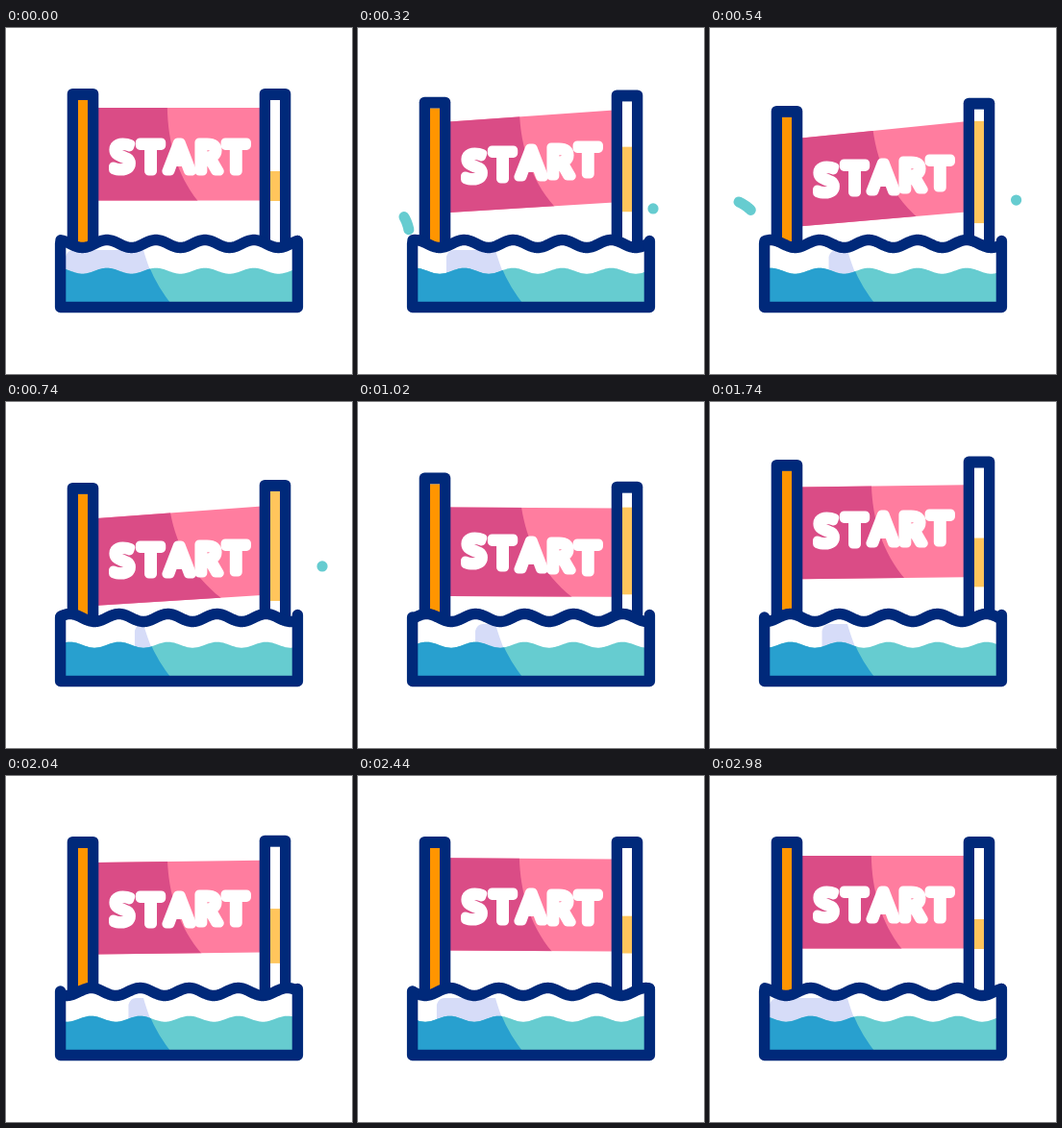
An HTML page with a canvas for the animation above (3 s loop, 360 by 360 pixels).

```html
<!DOCTYPE html>
<html lang="en">
<head>
<meta charset="utf-8">
<title>Start banner in water</title>
<style>
html, body { margin: 0; width: 100%; height: 100%; overflow: hidden; background: #fff; }
canvas { display: block; }
</style>
</head>
<body>
<canvas id="stage" width="360" height="360"></canvas>
<script>
const ctx = document.getElementById('stage').getContext('2d');
const LOOP = 3000;
const WAVELENGTH = 51;
const NAVY = '#00297a', ORANGE = '#ff9500', GOLD = '#ffc55c', TEAL = '#66ccd0',
  BLUE = '#28a0cf', PINK = '#ff7d9f', MAGENTA = '#da4c86', LAVENDER = '#d6dcf8';

const ramp = (t, a, b) => Math.min(1, Math.max(0, (t - a) / (b - a)));
const ease = (t, a, b) => (1 - Math.cos(Math.PI * ramp(t, a, b))) / 2;

// Sink, rise, swing back and settle; parts further right follow later.
function bob(t, x, sink, rise, back) {
  const u = t - (x - 80);
  return sink * ease(u, 0, 720) + (rise - sink) * ease(u, 720, 1440)
    + (back - rise) * ease(u, 1440, 2000) - back * ease(u, 2000, 2700);
}

function rect(color, x, y, w, h) {
  ctx.fillStyle = color;
  ctx.fillRect(x, y, w, h);
}

function wave(t, y, height) {
  const crest = 207 + WAVELENGTH * t / LOOP;
  for (let x = 57; x <= 303; x++)
    ctx.lineTo(x, y - height * Math.cos((x - crest) * 2 * Math.PI / WAVELENGTH));
}

function waterPath(t, y, height) {
  ctx.beginPath();
  ctx.moveTo(57, 290);
  wave(t, y, height);
  ctx.lineTo(303, 290);
  ctx.closePath();
}

// Point on the curved flight of the left drop
function flight(u) {
  const v = 1 - u;
  return [54 * v * v + 108 * u * v + 30 * u * u, 222 * v * v + 384 * u * v + 181 * u * u];
}

function drops(t) {
  ctx.fillStyle = ctx.strokeStyle = TEAL;
  ctx.lineCap = 'round';
  if (t > 140 && t < 680) {
    const head = ramp(t, 140, 500), tail = ramp(t, 220, 680);
    ctx.lineWidth = 11 * (1 - ramp(t, 560, 680));
    ctx.beginPath();
    for (let i = 0; i <= 12; i++) ctx.lineTo(...flight(tail + (head - tail) * i / 12));
    ctx.stroke();
  }
  const u = (t - 320) / 420;
  const r = 5.6 * ramp(t, 120, 260) * (1 - ramp(t, 800, 960));
  ctx.beginPath();
  ctx.arc(307 + 22 * u, 188 - 17 * u, r, 0, 2 * Math.PI);
  ctx.fill();
}

function flag(t) {
  const l = bob(t, 95, 38, 4, 7), r = bob(t, 266, 29, 3, 5);
  ctx.save();
  ctx.beginPath();
  ctx.moveTo(95, 83 + l);
  ctx.lineTo(266, 83 + r);
  ctx.lineTo(266, 179.5 + 0.85 * r);
  ctx.lineTo(95, 179.5 + 0.85 * l);
  ctx.clip();
  rect(PINK, 90, 60, 180, 170);
  ctx.fillStyle = MAGENTA;
  ctx.beginPath();
  ctx.moveTo(90, 70);
  ctx.lineTo(168, 70);
  ctx.bezierCurveTo(166, 120, 180, 170, 224, 204);
  ctx.lineTo(228, 230);
  ctx.lineTo(90, 230);
  ctx.fill();
  ctx.restore();
}

function label(t) {
  ctx.font = '41.5px "Noto Sans", sans-serif';
  ctx.textAlign = 'center';
  ctx.lineJoin = 'round';
  ctx.lineWidth = 9.2;
  ctx.fillStyle = ctx.strokeStyle = '#fff';
  [...'START'].forEach((c, i) => {
    const x = 121 + 29.6 * i;
    const y = 148.8 + bob(t, x, 31, -4, 5);
    ctx.strokeText(c, x, y);
    ctx.fillText(c, x, y);
  });
}

function pole(t, x, color, top, end) {
  const y = 63 + bob(t, x, 21, -7, 0);
  ctx.fillStyle = NAVY;
  ctx.beginPath();
  ctx.roundRect(x - 16.3, y, 32.6, 232 - y, 5.5);
  ctx.fill();
  rect('#fff', x - 5, y + 12, 10, 220 - y);
  const from = Math.max(top, y + 12);
  rect(color, x - 5, from, 10, end - from);
}

function tank(t) {
  ctx.save();
  waterPath(t, 224.5, 4);
  ctx.fillStyle = '#fff';
  ctx.fill();
  ctx.clip();

  // Pale shadow above the water
  const left = 62 + bob(t, 80, 72, 40, 66);
  ctx.fillStyle = LAVENDER;
  ctx.beginPath();
  ctx.moveTo(left, 260);
  ctx.lineTo(left, 238);
  ctx.quadraticCurveTo(left + 2, 231, left + 8, 231);
  ctx.lineTo(143, 231);
  ctx.quadraticCurveTo(146, 242, 153, 260);
  ctx.fill();

  waterPath(t, 252.7, 3);
  ctx.clip();
  rect(TEAL, 57, 240, 246, 50);
  ctx.fillStyle = BLUE;
  ctx.beginPath();
  ctx.moveTo(57, 240);
  ctx.lineTo(146, 240);
  ctx.quadraticCurveTo(154, 265, 174, 290);
  ctx.lineTo(57, 290);
  ctx.fill();
  ctx.restore();

  ctx.strokeStyle = NAVY;
  ctx.lineWidth = 11.4;
  ctx.lineCap = ctx.lineJoin = 'round';
  ctx.beginPath();
  wave(t, 224.5, 4);
  ctx.stroke();
  ctx.beginPath();
  ctx.moveTo(56.6, 224);
  ctx.lineTo(56.6, 290.5);
  ctx.lineTo(303.4, 290.5);
  ctx.lineTo(303.4, 221.5);
  ctx.stroke();
}

function draw(t) {
  rect('#fff', 0, 0, 360, 360);
  drops(t);
  flag(t);
  label(t);
  pole(t, 80, ORANGE, 0, 232);
  pole(t, 280, GOLD, 149 + bob(t, 80, -61, -3, -11), 180 + bob(t, 80, 27, 9, 15));
  tank(t);
}

const start = performance.now();
function tick() {
  draw((performance.now() - start) % LOOP);
  requestAnimationFrame(tick);
}
tick();
</script>
</body>
</html>
```
